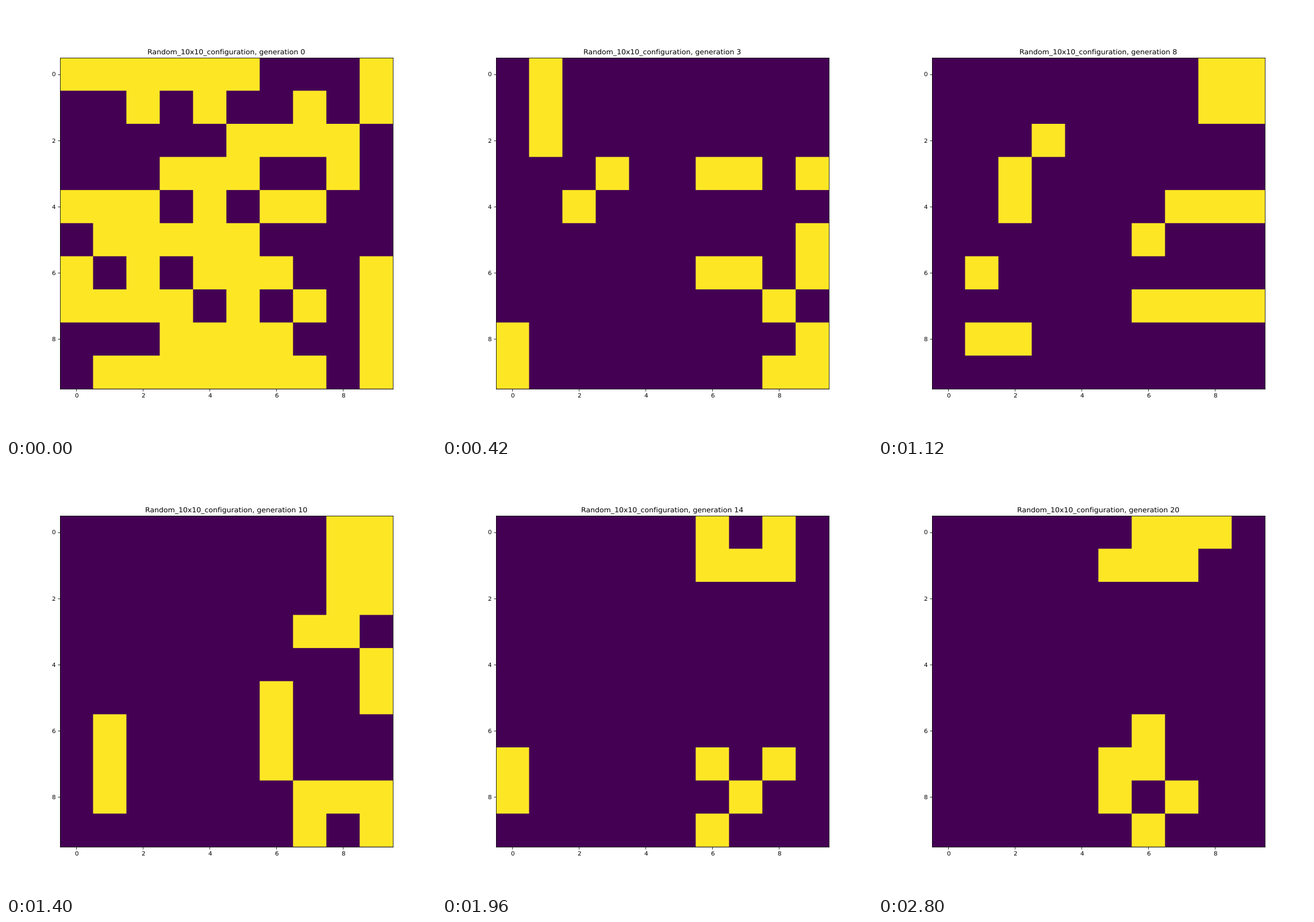
Recreate the animation shown at these times as a matplotlib script. Size 748 by 748 pixels, loop 2.94 s.

```python
import numpy as np
import matplotlib.pyplot as plt
from matplotlib.animation import FuncAnimation
from matplotlib.patches import PathPatch
from matplotlib.path import Path

INCHES, DPI = 10, 74.8
GENERATIONS, INTERVAL = 21, 140
DEAD, ALIVE = "#440154", "#fde725"

# The seed of the whole run; every later generation follows from the rules.
SEED = """
######...#
..#.#..#.#
.....####.
...###..#.
###.#.##..
.#####....
#.#.###..#
####.#.#.#
...####..#
.#######.#
"""


def step(grid):
    """Advance Conway's rules by one generation on a torus."""
    block = sum(np.roll(grid, (dy, dx), (0, 1))
                for dy in (-1, 0, 1) for dx in (-1, 0, 1))
    return (block == 3) | (grid & (block == 4))


def cells_path(grid):
    """Join all live cells in one path, so neighbours meet without seams."""
    unit = Path.unit_rectangle()
    return Path.make_compound_path(*(
        Path(unit.vertices + (x - 0.5, y - 0.5), unit.codes)
        for y, x in np.argwhere(grid)))


grid = np.array([[c == "#" for c in row] for row in SEED.split()])
paths = []
for _ in range(GENERATIONS):
    paths.append(cells_path(grid))
    grid = step(grid)

plt.rcParams.update({"font.family": "DejaVu Sans", "text.hinting": "none"})
fig, ax = plt.subplots(figsize=(INCHES, INCHES), dpi=DPI)
ax.set(xlim=(-0.5, 9.5), ylim=(9.5, -0.5), facecolor=DEAD)
ax.xaxis.set_major_locator(plt.MultipleLocator(2))
ax.yaxis.set_major_locator(plt.MultipleLocator(2))
title = ax.set_title("")
cells = ax.add_patch(PathPatch(paths[0], facecolor=ALIVE, linewidth=0,
                               snap=False))


def update(n):
    cells.set_path(paths[n])
    title.set_text(f"Random_10x10_configuration, generation {n}")
    return cells, title


anim = FuncAnimation(fig, update, frames=GENERATIONS, interval=INTERVAL,
                     repeat=True, repeat_delay=0, blit=False)
plt.show()
```
